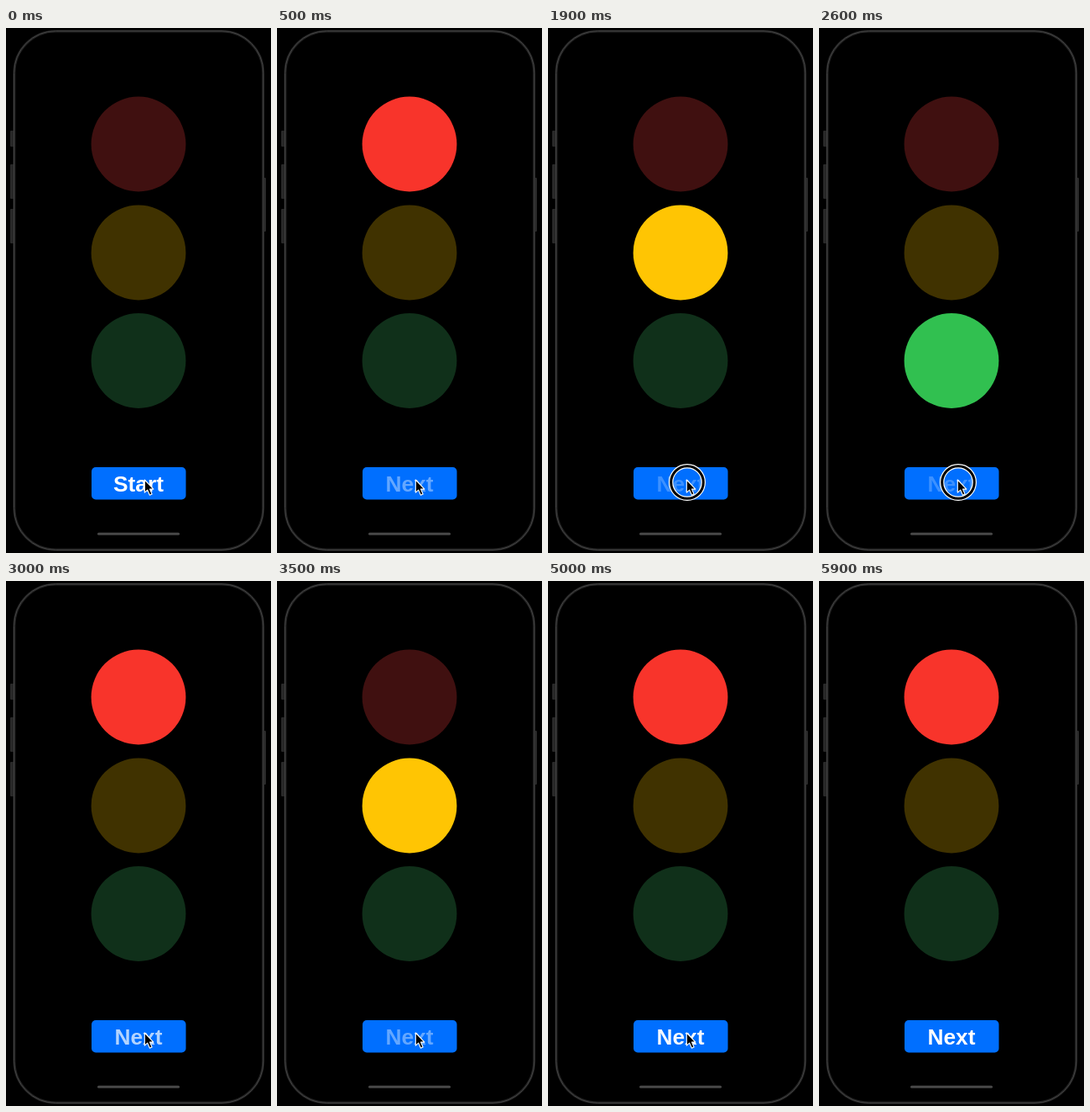
An HTML page that plays this animation: 316 px wide and 624 px high, repeating every 6100 ms.

```html
<!DOCTYPE html>
<html lang="en">
<head>
<meta charset="utf-8">
<title>Traffic light</title>
<style>
  html, body { margin: 0; width: 100%; height: 100%; overflow: hidden; background: #000; }
  svg { display: block; width: 316px; height: 624px; }
  text { font: bold 26.3px "Liberation Sans", Arial, sans-serif; text-anchor: middle; fill: #fff; }
</style>
</head>
<body>
<svg viewBox="0 0 316 624">
  <g fill="#292929">
    <rect x="5" y="122" width="6" height="19" rx="1"/>
    <rect x="5" y="162" width="6" height="41" rx="1"/>
    <rect x="5" y="215" width="6" height="41" rx="1"/>
    <rect x="305" y="178" width="5" height="64" rx="1"/>
  </g>
  <rect x="10" y="4" width="296.5" height="616" rx="49" stroke="#202020" stroke-width="3"/>
  <rect x="9.5" y="3.5" width="297.5" height="617" rx="50" fill="none" stroke="#454545"/>
  <g id="lights">
    <circle cx="158" cy="138" r="56.4"/>
    <circle cx="158" cy="267" r="56.4"/>
    <circle cx="158" cy="395.5" r="56.4"/>
  </g>
  <rect x="102" y="522" width="112.5" height="38.5" rx="5" fill="#006fff"/>
  <text id="label" x="158" y="551"></text>
  <rect x="109" y="599.8" width="98" height="3" rx="1.5" fill="#484848"/>
  <g id="ring" fill="none">
    <circle cx="166" cy="540" r="19.3" stroke="#fff" stroke-width="5.4"/>
    <circle cx="166" cy="540" r="19.3" stroke="#000" stroke-width="3"/>
  </g>
  <path id="cursor" d="M165.3 537v15.2l3.4-3.1 2.7 6.1 2.7-1.2-2.6-5.9h4.4z"
        stroke="#fff" stroke-width="1.1" stroke-linejoin="round"/>
</svg>
<script>
const LOOP = 6100, STEP = 100, DELAY = 300, FADE = 350, DIM = 0.24;
const CLICKS = [100, 1100, 1800, 2500, 3100, 3700, 4400];
const ON = ["#f8342b", "#ffc503", "#31c050"];
const OFF = ["#401010", "#403200", "#10301a"];
const $ = id => document.getElementById(id);
const lights = [...$("lights").children];
const show = (id, visible) => $(id).setAttribute("visibility", visible ? "visible" : "hidden");

// The label dims while pressed, then eases back after the light changes.
function labelOpacity(age) {
  if (age < 100) return 1;
  const u = Math.min(1, Math.max(0, (age - DELAY) / FADE));
  return DIM + (1 - DIM) * u * u * (3 - 2 * u);
}

function draw(now) {
  const t = Math.floor(now % LOOP / STEP) * STEP;
  const started = CLICKS.filter(c => c <= t);
  const changes = CLICKS.filter(c => c + DELAY <= t).length;
  const age = started.length ? t - started.at(-1) : -1;
  const active = changes ? (changes - 1) % 3 : -1;

  lights.forEach((light, i) => light.setAttribute("fill", (i === active ? ON : OFF)[i]));
  $("label").textContent = changes ? "Next" : "Start";
  $("label").setAttribute("opacity", labelOpacity(age));
  show("ring", age >= 0 && age < 200);
  show("cursor", t < 5600);
}

const start = performance.now();
function tick() {
  draw(performance.now() - start);
  requestAnimationFrame(tick);
}
tick();
</script>
</body>
</html>
```
